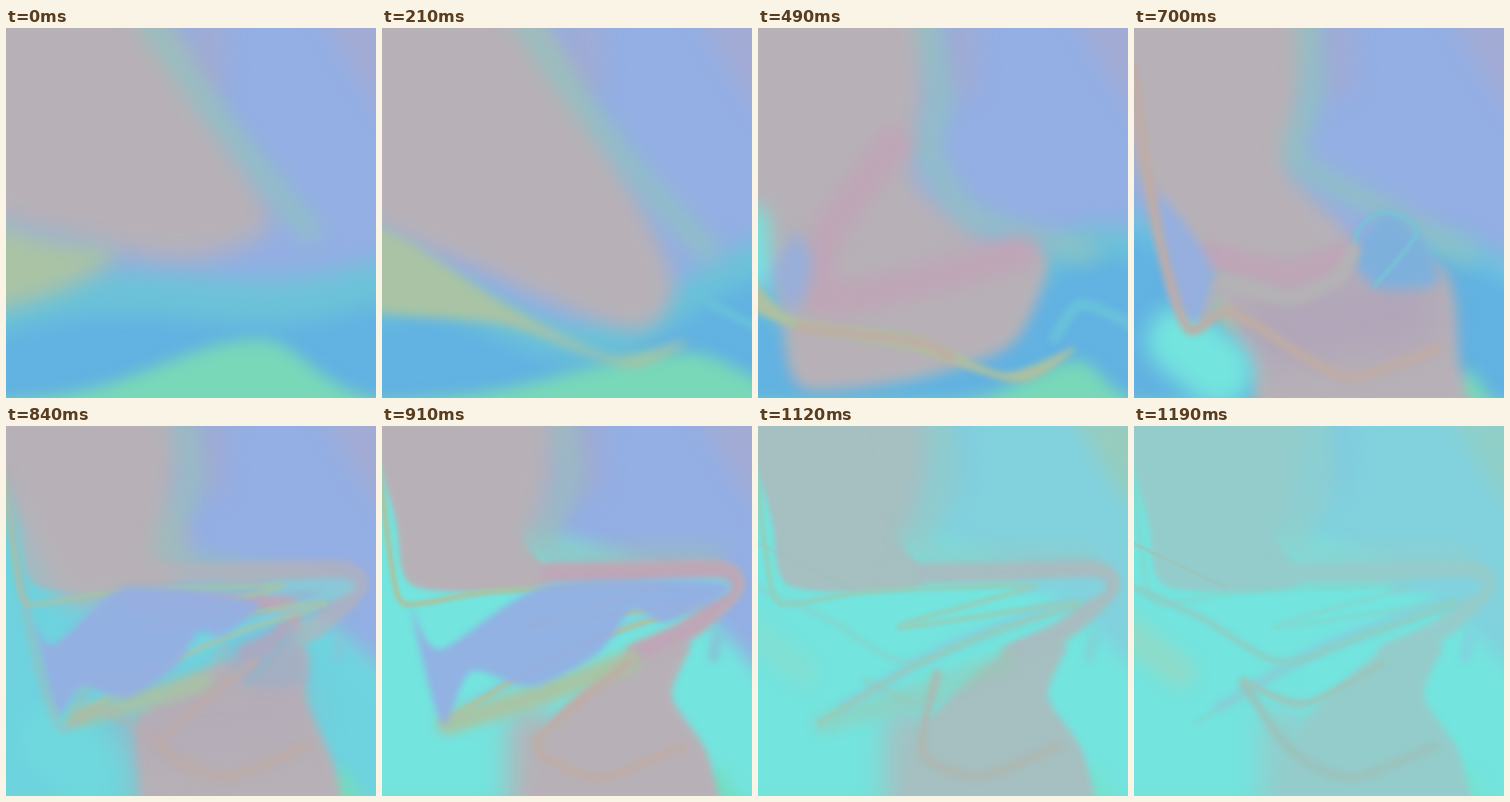
Animation, 480 px wide and 480 px high, one loop 1330 ms. Source, as an HTML page with a canvas:

```html
<!DOCTYPE html>
<html lang="en">
<head>
<meta charset="utf-8">
<title>Liquid gradient</title>
<style>
html, body { margin: 0; width: 100%; height: 100%; overflow: hidden; background: #94afe4; }
canvas { display: block; width: 100vw; height: 100vh; }
</style>
</head>
<body>
<canvas id="c" width="480" height="480"></canvas>
<script>
const ctx = document.getElementById('c').getContext('2d');
const SIZE = 480, TICK = 70, LAST = 17, LOOP = 1330, N = 110;

const mixAll = (a, b, k) => a.map((v, i) => v + (b[i] - v) * k);
const rgb = hex => [1, 3, 5].map(i => parseInt(hex.slice(i, i + 2), 16));

// A track maps ticks to values; between ticks the value moves evenly.
function track(keys, parse = v => [].concat(v)) {
  if (typeof keys !== 'object') keys = { 0: keys };
  const ticks = Object.keys(keys).map(Number);
  const values = ticks.map(t => parse(keys[t]));
  return t => {
    const i = ticks.findLastIndex(s => s <= t);
    if (i < 0) return values[0];
    if (i === ticks.length - 1) return values[i];
    return mixAll(values[i], values[i + 1], (t - ticks[i]) / (ticks[i + 1] - ticks[i]));
  };
}

// Smooth curve through a few points, resampled evenly by length to N points.
function trace(text, closed) {
  const p = text.split(' ').map(s => s.split(',').map(Number));
  const n = p.length, fine = [], len = [0];
  const at = i => closed ? p[(i + n) % n] : p[Math.max(0, Math.min(n - 1, i))];
  const spans = closed ? n : n - 1;
  for (let i = 0; i < spans; i++) {
    const [a, b, c, d] = [at(i - 1), at(i), at(i + 1), at(i + 2)];
    for (let t = 0; t < 1; t += 1 / 16) {
      fine.push([0, 1].map(k => {
        const m = (c[k] - a[k]) * .38, q = (d[k] - b[k]) * .38, e = c[k] - b[k];
        return b[k] + t * (m + t * (3 * e - 2 * m - q + t * (m + q - 2 * e)));
      }));
    }
  }
  fine.push(at(spans));
  for (let i = 1; i < fine.length; i++)
    len.push(len[i - 1] + Math.hypot(fine[i][0] - fine[i - 1][0], fine[i][1] - fine[i - 1][1]));
  const out = [];
  for (let i = 0, j = 1; i < N; i++) {
    const d = len.at(-1) * i / (N - 1);
    while (j < fine.length - 1 && len[j] < d) j++;
    out.push(...mixAll(fine[j - 1], fine[j], (d - len[j - 1]) / (len[j] - len[j - 1] || 1)));
  }
  return out;
}

// Everything under the curve y = f(x), down past the bottom edge.
function under(f) {
  const pts = [];
  for (let x = -80; x <= SIZE + 80; x += 10) pts.push(x, f(x));
  return [...pts, SIZE + 80, SIZE + 80, -80, SIZE + 80];
}

const layers = [];
function add(path, color, blur, { width = 0, alpha = 1 } = {}) {
  layers.push({
    path: typeof path === 'function' ? path : track(path, s => trace(s, !width)),
    color: track(color, rgb), blur: track(blur), width: track(width), alpha: track(alpha)
  });
}
const line = (path, color, blur, width, alpha) => add(path, color, blur, { width, alpha });

// Colours that drift
const CYAN = '#82d2de', AQUA = '#74e4de', TAN = '#bfaca5';
const blue = { 13: '#94afe4', 15: CYAN };
const grey = { 15: '#b7b1b7', 17: '#94cccb' };
const sea = { 7: '#62b2e2', 10: '#62b2e2', 13: AQUA };
const foam = { 7: '#6cc3d8', 10: '#70c4de', 13: AQUA };
const olive = { 15: '#a8c4a4', 17: '#8ccfc4' };
const late = { 10: 0, 13: 1 };

// Sky
add(() => under(() => -80), blue, 0);
add('390,-80 430,20 490,108 580,160 580,-80', { 13: '#a2abd4', 15: '#9cc8b2', 17: '#8fcfc8' }, 14);
line('265,-40 262,70', { 13: '#a0abd4', 15: '#84cfdc', 17: '#80cbe0' }, 15, 44);

// Water: level, tilt, swell and phase
const swell = track({
  0: [395, -35, 14, Math.PI], 3: [420, -55, 42, -2], 7: [420, -70, 60, -1],
  10: [290, 60, 40, -.6], 13: [-10, 330, 30, 0]
});
const lift = track({ 0: 58, 10: 30, 13: 0 });
const water = rise => t => {
  const [level, tilt, amp, phase] = swell(t);
  return under(x => level + tilt * x / SIZE + amp * Math.sin(phase + x / SIZE * 2 * Math.PI) - rise * lift(t)[0]);
};
add(water(1), foam, 16);
add(water(0), sea, 14);

// Green mound: centre, spread, height
const mound = track({ 0: [330, 180, 82], 3: [395, 210, 65], 7: [415, 90, 55], 10: [438, 34, 42] });
add(t => {
  const [c, w, h] = mound(t);
  return under(x => 486 - h * Math.exp(-(((x - c) / (x > c ? w / 2 : w)) ** 2)));
}, { 10: '#78d8b8', 13: '#75dcc0', 17: '#76e2d2' }, 10);
line({ 3: '408,342 440,365 495,392', 7: '385,402 420,358 495,390' }, '#68c1da', 5,
  { 3: 11, 7: 15 }, { 0: 0, 3: 1, 7: 1, 10: 0 });

// Grey body
add({
  0: '-80,-80 165,-60 270,110 345,250 240,300 110,278 -80,205',
  3: '-80,-80 165,-60 270,110 375,320 330,392 150,322 -80,200',
  7: '-80,-80 205,-60 215,100 205,200 300,290 70,330 -80,215',
  10: '-80,-80 215,-60 215,110 205,190 290,290 110,325 20,220 -80,-20',
  13: '-80,-80 215,-60 222,80 195,160 130,172 60,170 -40,-80'
}, grey, { 0: 16, 3: 13, 7: 15, 10: 12, 13: 18 });
add('-20,-60 18,120 42,208 215,204 150,100 130,-60', grey, 3, { alpha: late });

// Ridge shimmer
line({
  0: '180,-15 270,110 395,264', 3: '180,-15 260,100 350,210 424,290',
  7: '215,-20 237,90 222,160 280,245 430,290',
  10: '225,-20 230,90 210,170 325,236 432,292',
  13: '230,-20 245,70 205,150 250,170 430,172'
}, { 10: '#90c2c0', 13: '#9abcbd', 15: '#92c6c6', 17: '#90cfce' }, 14, 24);
line('435,272 430,300', { 13: '#86c5d6', 15: '#7dd6cc', 17: CYAN }, 5, 14, late);

// Lower mass and the fold that joins it to the body
line('195,395 195,540', grey, 18, 60, late);
add({
  7: '50,310 300,285 375,300 330,410 200,455 60,468 34,400',
  10: '100,335 280,300 400,312 422,430 428,560 180,560 150,430',
  13: '210,400 325,290 400,280 376,350 424,430 430,560 200,560'
}, grey, { 7: 9, 10: 8, 13: 4 }, { alpha: { 3: 0, 7: 1 } });
const fold = '170,191 300,190 435,188 455,210 400,262 330,295';
line(fold, grey, 4, 27, late);
line('180,390 350,370', '#b1a6b9', 22, 100, { 7: 0, 10: 1, 13: 0 });
line({ 7: '175,150 90,270 85,350 220,325 340,292', 10: '100,295 200,318 275,295',
  13: fold.replace('170', '215') },
  '#bea6b7', { 7: 10, 10: 7, 13: 5 }, { 7: 46, 10: 36, 13: 20 }, { 3: 0, 7: 1, 13: 1, 15: .15, 17: 0 });

// Left pool and the arch
line({ 7: '-8,250 -2,320', 10: '62,405 110,445' }, AQUA, 14, { 7: 40, 10: 90 }, { 3: 0, 7: 1, 10: 1, 13: 0 });
const brief = { 7: 0, 10: 1, 13: 0 };
add('285,300 325,240 368,268 395,330 320,338', '#7eb0dc', 8, { alpha: brief });
line('282,302 292,260 325,238 368,264 312,335', '#76c3d6', 2, 5, brief);
line('92,372 112,328 200,350 262,325 284,288', '#b4b2b5', 5, 20, brief);

// Inside the fold: bright folds of olive, uncovered as the blue drains
line('340,210 445,209 250,285 110,365', CYAN, 5, 15, late);
line({ 10: '110,360 125,382', 13: '85,386 200,350 320,305' }, olive, 7, { 10: 20, 13: 28 },
  { 7: 0, 10: .6, 13: 1, 15: 1, 17: 0 });
line('-5,40 8,150 22,225 50,230 150,214 340,207 345,212 178,262 418,228 300,268 190,318 80,385',
  olive, 2, 7, { 10: 0, 13: 1, 15: 1, 17: .4 });
add({
  7: '50,265 70,310 45,372 25,315', 10: '30,215 100,310 80,385 45,340',
  13: '215,206 450,205 370,255 325,238 280,295 195,338 115,318 78,388 38,235 75,290'
}, { 7: '#98aeda', 13: '#94afe4' }, { 7: 9, 10: 7, 13: 4 }, { alpha: { 3: 0, 7: 1, 10: 1, 13: .93, 15: 0 } });

// Warm tongue and ribbons
add({
  0: '-80,245 60,275 145,292 60,345 -80,370',
  3: '-80,245 20,268 160,358 300,427 399,403 320,440 160,385 -80,355',
  7: '-60,260 40,372 200,398 320,447 415,412 340,460 200,418 35,385 -60,330'
}, { 3: '#a9c3a4', 7: '#aec0a0' }, { 0: 14, 3: 7, 7: 4 }, { alpha: { 7: 1, 10: 0 } });
line({ 7: '55,388 210,408 250,428', 10: '-2,50 30,260 70,390 125,368 230,432 290,452 395,415' },
  TAN, 4, 12, { 3: 0, 7: 1, 10: 1, 13: 0 });
line({ 15: '322,305 203,405 230,440 290,455 390,415', 17: '143,335 190,405 230,440 290,455 390,415' },
  { 15: TAN, 17: '#9cc1ba' }, 4, 10, late);

// Closing wisps
const end = { 15: 0, 17: 1 };
line('-10,205 90,250 190,306 300,272 418,228', '#8bcfc6', 3, 8, end);
line('140,330 220,360 322,308', '#9bc5bb', 3, 8, end);
line('-5,150 118,209', '#9cc4bc', 1, 3, end);
line('-10,265 60,320', '#8edbc9', 11, 40, end);

function draw(t) {
  ctx.lineCap = ctx.lineJoin = 'round';
  for (const l of layers) {
    const [alpha] = l.alpha(t), [blur] = l.blur(t), [width] = l.width(t);
    if (!alpha) continue;
    const pts = l.path(t);
    ctx.globalAlpha = alpha;
    ctx.filter = blur ? `blur(${blur}px)` : 'none';
    ctx.fillStyle = ctx.strokeStyle = `rgb(${l.color(t).map(Math.round)})`;
    ctx.lineWidth = width || 1;
    ctx.beginPath();
    for (let i = 0; i < pts.length; i += 2) ctx.lineTo(pts[i], pts[i + 1]);
    if (width) ctx.stroke(); else ctx.fill();
  }
}

const start = performance.now();
let shown = -1;
function frame() {
  const t = (performance.now() - start) % LOOP;
  const tick = Math.min(LAST, Math.floor(t / TICK));
  if (tick !== shown) draw(shown = tick);
  requestAnimationFrame(frame);
}
frame();
</script>
</body>
</html>
```
